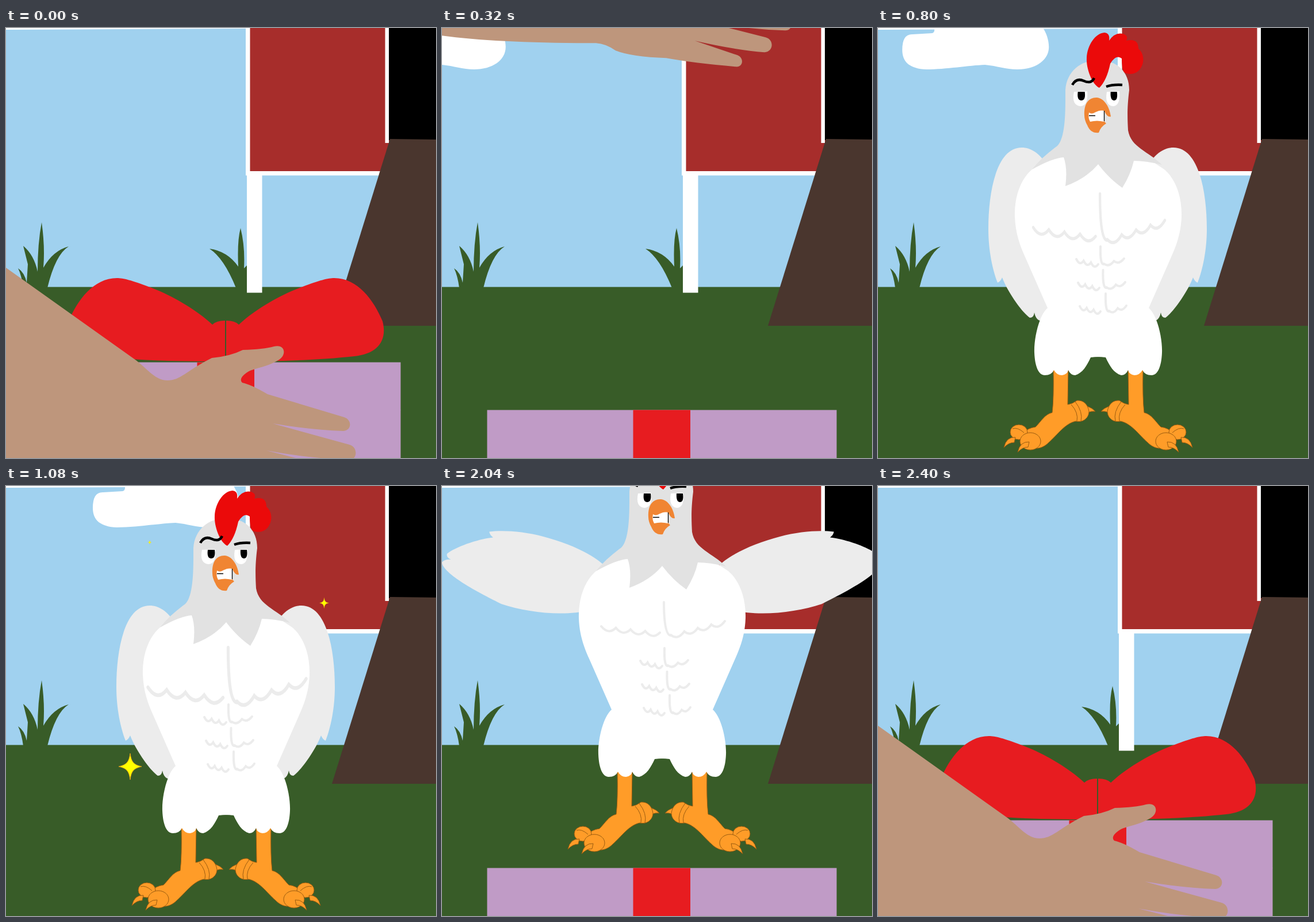
These frames come from a looping animation (748 px wide and 748 px high, 2680 ms). An HTML page:

```html
<!DOCTYPE html>
<html lang="en">
<head>
<meta charset="utf-8">
<title>Rooster in a gift box</title>
<style>
html, body { margin: 0; width: 100%; height: 100%; overflow: hidden; background: #fff; }
svg { display: block; width: 100vw; height: 100vh; }
</style>
</head>
<body>
<svg viewBox="0 0 748 748">
  <defs>
    <path id="wing" fill="#ececec" d="M250,208C207,208 192,282 192,350C192,386 199,420 208,443Q213,441 216,434C226,460 250,494 264,504Q271,504 272,495Q274,506 281,509C301,500 316,430 324,390C328,320 305,208 250,208Z"/>
    <path id="side" fill="#fff" d="M385,190L330,205L268,246C249,262 237,292 238,328C239,360 249,383 258,403L295,487C280,500 271,540 272,565C273,590 280,604 290,604Q302,604 306,595Q311,604 320,604Q329,603 331,595Q335,604 343,604C356,600 363,588 370,573Q377,572 385,572Z"/>
    <g id="leg" fill="#ff9c28" stroke="#9a5c10" stroke-linejoin="round">
      <path d="M364,658Q373,661 378,667Q371,666 365,669Z"/>
      <path d="M305,594Q306,645 303,669C290,672 284,684 274,694Q260,696 254,704L262,728C275,735 288,730 297,721C312,708 325,688 344,684C357,687 367,678 367,667C365,654 357,647 346,648Q338,654 330,655L331,594Z"/>
      <ellipse cx="245" cy="703" rx="15" ry="13"/>
      <ellipse cx="265" cy="719" rx="18" ry="15"/>
      <path id="claw" d="M239,712Q223,711 219,730Q227,721 237,721Z"/>
      <use href="#claw" x="24" y="8"/>
      <path fill="none" d="M336,655Q349,669 346,684M343,650Q357,668 353,684M234,697Q243,694 254,704"/>
    </g>
    <path id="ray" d="M0,-23C2,-8 6,-3 20,0C6,3 2,8 0,23C-2,8 -6,3 -20,0C-6,-3 -2,-8 0,-23Z" fill="#ff0" stroke="#e8a21a" stroke-width=".9"/>
    <g id="gift">
      <path fill="#c09bc6" d="M78.500,0H686.500V83.500H78.500Z"/>
      <path fill="#e71c20" d="M332.500,0H432V83.500H332.500Z"/>
    </g>
    <path id="loop" fill="#e71c20" d="M383,509Q398,509 405,516C433,490 475,465 516,450C545,439 560,435 571,435C612,435 640,474 655,510C664,544 646,567 606,571C540,578 480,580 383,580Z"/>
  </defs>

  <path fill="#a0d1ef" d="M0,3L417,1H748V460H0Z"/>
  <path id="cloud" fill="#fff" d="M0,38Q0,10 18,11L52,9Q56,8 56,3V-6H240C248,2 255,18 255,33C255,56 232,72 200,72C180,72 165,66 144,64C116,65 76,72 42,72C14,71 0,60 0,38Z"/>
  <path fill="#385c28" d="M0,450.500H748V748H0Z"/>
  <path fill="#385c28" d="M30,452Q27,430 21,418Q32,425 36,443L38,411L30,379Q49,395 55,424Q55,375 62,338Q68,380 65,417Q82,387 109,380Q86,394 72,452ZM400,452Q379,400 354,384Q385,388 404,415Q402,370 408,348Q416,380 414,418L420,412V452Z"/>
  <path fill="#fff" d="M417,0H748V256.500H417ZM419,250H445.500V460.500H419Z"/>
  <path fill="#a72d2b" d="M424.500,0H700V249H424.500Z"/>
  <path fill="#fff" d="M659.500,0H670V193H666V200H659.500Z"/>
  <path fill="#000" d="M666,0H748V195H666Z"/>
  <path fill="#4a362e" d="M668,193L748,194V518H567Z"/>

  <g id="bird">
    <use id="wingL" href="#wing"/>
    <g transform="matrix(-1 0 0 1 764 0)"><use id="wingR" href="#wing"/></g>
    <use href="#leg"/>
    <use href="#side"/>
    <g transform="matrix(-1 0 0 1 766 0)"><use href="#leg"/><use href="#side"/></g>
    <path fill="#e2e2e2" d="M268,246C284,226 300,214 312,205C327,190 326,140 326,108C328,76 352,56 383,56C416,56 437,76 437,108C433,140 434,158 435,178C440,208 470,214 494,238Q466,231 445,231Q440,254 425,278Q402,262 383,237Q362,262 326,275Q330,244 323,225Q304,226 268,246Z"/>
    <path fill="#eb0a0a" d="M385,104C372,98 362,70 363,52C364,30 378,9 394,8Q404,9 402,22Q412,7 426,10Q436,13 432,22Q453,17 453,36C462,43 464,58 458,68C452,80 438,83 428,77Q424,70 424,53Q414,45 404,62Q398,91 385,104Z"/>
    <path fill="#fff" d="M341,111L364,110Q366,136 352,136Q336,134 341,111ZM398,111L420,110Q422,135 409,136Q394,135 398,111Z"/>
    <path id="pupils" d="M351,111H363Q365,126 357,126T351,111ZM408,111H419Q421,126 414,126T408,111Z"/>
    <path fill="none" stroke="#000" stroke-width="4.500" d="M338,99Q345,86 358,92T376,87M397,102Q408,98 425,99"/>
    <path fill="#f08533" d="M359,152C358,132 366,121 380,121C394,122 403,138 405,154Q399,156 394,145V163L397,166Q387,172 384,182Q370,184 364,169Q359,160 359,152Z"/>
    <path fill="#fff" d="M367,147C375,153 380,141 393,144V163Q381,160 369,163Q365,156 367,147Z"/>
    <path fill="none" stroke="#000" stroke-width="1.300" d="M367,152.500H378M393.500,144V162"/>
    <g fill="none" stroke="#ececec" stroke-width="4" stroke-linecap="round">
      <path id="pecs"/>
      <path id="abs"/>
    </g>
  </g>

  <g id="sparks"></g>
  <g id="box"><use href="#gift" y="664.500"/></g>

  <g id="lid">
    <use href="#gift" y="581.500"/>
    <use href="#loop"/>
    <use href="#loop" transform="matrix(-1 0 0 1 764 0)"/>
    <path fill="#be967c" d="M0,417L222,575C245,591 258,613 281,613C304,613 312,597 358,574Q390,571 412,560Q448,559 466,554C485,549 489,568 475,577C450,592 430,591 418,600Q404,610 411,617Q426,620 455,637L588,677C602,681 602,700 587,701Q530,699 464,688L598,725C612,729 612,751 597,751Q530,749 453,735L563,763C578,767 577,788 561,789Q510,785 440,769L514,794C526,799 524,815 511,814Q440,808 390,799Q330,797 302,786Q285,774 268,773Q95,773 0,760Z"/>
  </g>
</svg>
<script>
const LOOP = 2680, STEP = 40;
const el = id => document.getElementById(id);
const put = (node, value) => node.setAttribute('transform', value);

// 0 before a, 1 after b
const ramp = (t, a, b) => Math.min(1, Math.max(0, (t - a) / (b - a)));
const ease = (t, a, b) => { const p = ramp(t, a, b); return p * p * (3 - 2 * p); };

// A row of n sagging arcs from one point to another
function scallops(x0, y0, x1, y1, n, sag) {
  const dx = (x1 - x0) / n, dy = (y1 - y0) / n;
  return `M${x0},${y0}` + `q${dx / 2},${dy / 2 + sag} ${dx},${dy}`.repeat(n);
}

el('pecs').setAttribute('d',
  scallops(277, 342, 379, 353, 4, 14) + 'M386,300Q386,358 398,358' + scallops(398, 357, 492, 333, 4, 13));

let abs = '';
for (let row = 0; row < 3; row++) {
  const y = 380 + 41 * row, x = 387 + 4.5 * row;
  abs += scallops(345 + 3 * row, y + 22, 383 + 2 * row, y + 31, 3, 11)
    + `M${x},${y}q-1,32 6,31` + scallops(x + 6, y + 30, 428 + 2 * row, y + 21, 2, 9);
}
el('abs').setAttribute('d', abs);

const sparks = [[216, 488, 1.52], [553.5, 203.5, 0.96], [250, 98, 0.96]].map(([x, y, size], i) => {
  const node = document.createElementNS('http://www.w3.org/2000/svg', 'use');
  node.setAttribute('href', '#ray');
  el('sparks').append(node);
  return { node, x, y, size, start: 960 + 45 * i };
});

function draw(t) {
  const open = ramp(t, 0, 360) - ramp(t, 2040, 2400);
  const out = ramp(t, 320, 560) - ramp(t, 2040, 2240);
  const landed = ramp(t, 560, 760) - ramp(t, 1800, 2040);
  const boxGone = ramp(t, 440, 600) - ramp(t, 1840, 2000);
  const spread = ease(t, 360, 560) - ease(t, 600, 800) + ease(t, 1760, 2000) - ease(t, 2040, 2180);
  const flex = ramp(t, 350, 1080) - ramp(t, 1080, 1320);

  put(el('cloud'), `translate(${151 + 0.3885 * (t - 1080)} 0)`);
  put(el('lid'), `translate(0 ${-840 * open})`);
  put(el('box'), `translate(0 ${90 * boxGone})`);
  put(el('bird'), `translate(0 ${665 * (1 - out) - 98 * (out - landed)})`);
  for (const id of ['wingL', 'wingR']) put(el(id), `rotate(${105 * spread} 247 262)`);
  put(el('pupils'), `translate(${5 * ramp(t, 760, 880) - 5} 0)`);
  put(el('pecs'), `translate(384.5 329.3) scale(${1 + 0.28 * flex ** 3} ${1 + 0.64 * flex}) translate(-384.5 -329.3)`);

  for (const { node, x, y, size, start } of sparks) {
    const s = size * Math.max(0, 1 - Math.abs(t - start - 183) / 183);
    node.style.display = s > 0 ? '' : 'none';
    put(node, `translate(${x} ${y}) scale(${s})`);
  }
}

const begin = performance.now();
function tick() {
  const t = (performance.now() - begin) % LOOP;
  draw(Math.floor(t / STEP) * STEP);
  requestAnimationFrame(tick);
}
draw(0);
requestAnimationFrame(tick);
</script>
</body>
</html>
```
